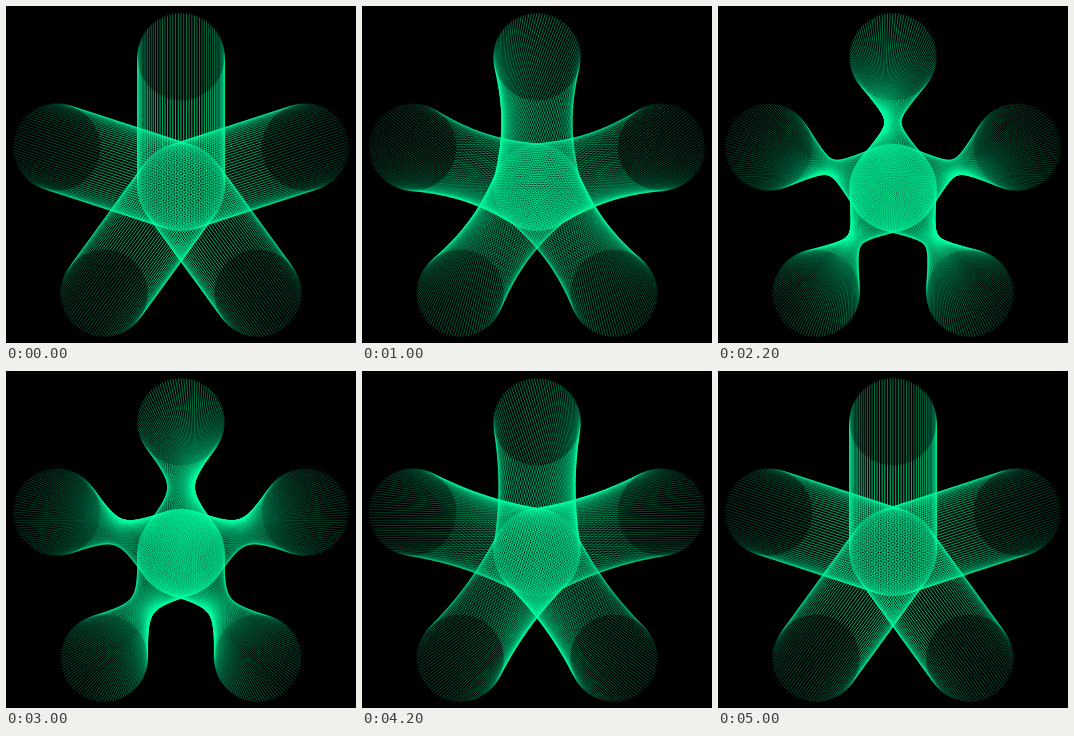
Write an HTML page with a canvas that moves like this. It is 350 by 337 pixels and loops after 5100 ms.

```html
<!DOCTYPE html>
<html lang="en">
<head>
<meta charset="utf-8">
<title>Twisting star</title>
<style>
  html, body { margin: 0; width: 100%; height: 100%; overflow: hidden; background: #000; }
  canvas { display: block; }
</style>
</head>
<body>
<canvas id="stage" width="350" height="337"></canvas>
<script>
const ctx = document.getElementById('stage').getContext('2d');
const TAU = Math.PI * 2;
const WIDTH = 350;
const HEIGHT = 337;
const CENTER = { x: 175, y: 181.5 };
const REACH = 130.7;
const RADIUS = 43.5;
const ARMS = 5;
const LINES = 100;
const STEP_MS = 100;
const STEPS = 51;

// Threads fade towards the left and right sides of the stage.
const threadColor = ctx.createLinearGradient(0, 0, WIDTH, 0);
threadColor.addColorStop(0, 'rgba(0, 255, 160, 0.4)');
threadColor.addColorStop(0.5, 'rgba(0, 255, 160, 1)');
threadColor.addColorStop(1, 'rgba(0, 255, 160, 0.4)');

function polar(origin, radius, angle) {
  return { x: origin.x + radius * Math.cos(angle), y: origin.y + radius * Math.sin(angle) };
}

// Straight threads join an outer ring to the central ring; neighbouring arms twist in opposite ways.
function drawArm(index, twist) {
  const hub = polar(CENTER, REACH, index * TAU / ARMS - TAU / 4);
  const turn = index % 2 ? twist : -twist;
  for (let i = 0; i < LINES; i++) {
    const angle = i * TAU / LINES;
    const from = polar(hub, RADIUS, angle);
    const to = polar(CENTER, RADIUS, angle + turn);
    ctx.beginPath();
    ctx.moveTo(from.x, from.y);
    ctx.lineTo(to.x, to.y);
    ctx.stroke();
  }
}

function draw(time) {
  const step = Math.floor(time / STEP_MS) % STEPS;
  const twist = step * TAU / (STEPS - 1);
  ctx.fillStyle = '#000';
  ctx.fillRect(0, 0, WIDTH, HEIGHT);
  ctx.strokeStyle = threadColor;
  ctx.lineWidth = 0.45;
  for (let k = 0; k < ARMS; k++) drawArm(k, twist);
}

const start = performance.now();
function tick() {
  draw(performance.now() - start);
  requestAnimationFrame(tick);
}
tick();
</script>
</body>
</html>
```
